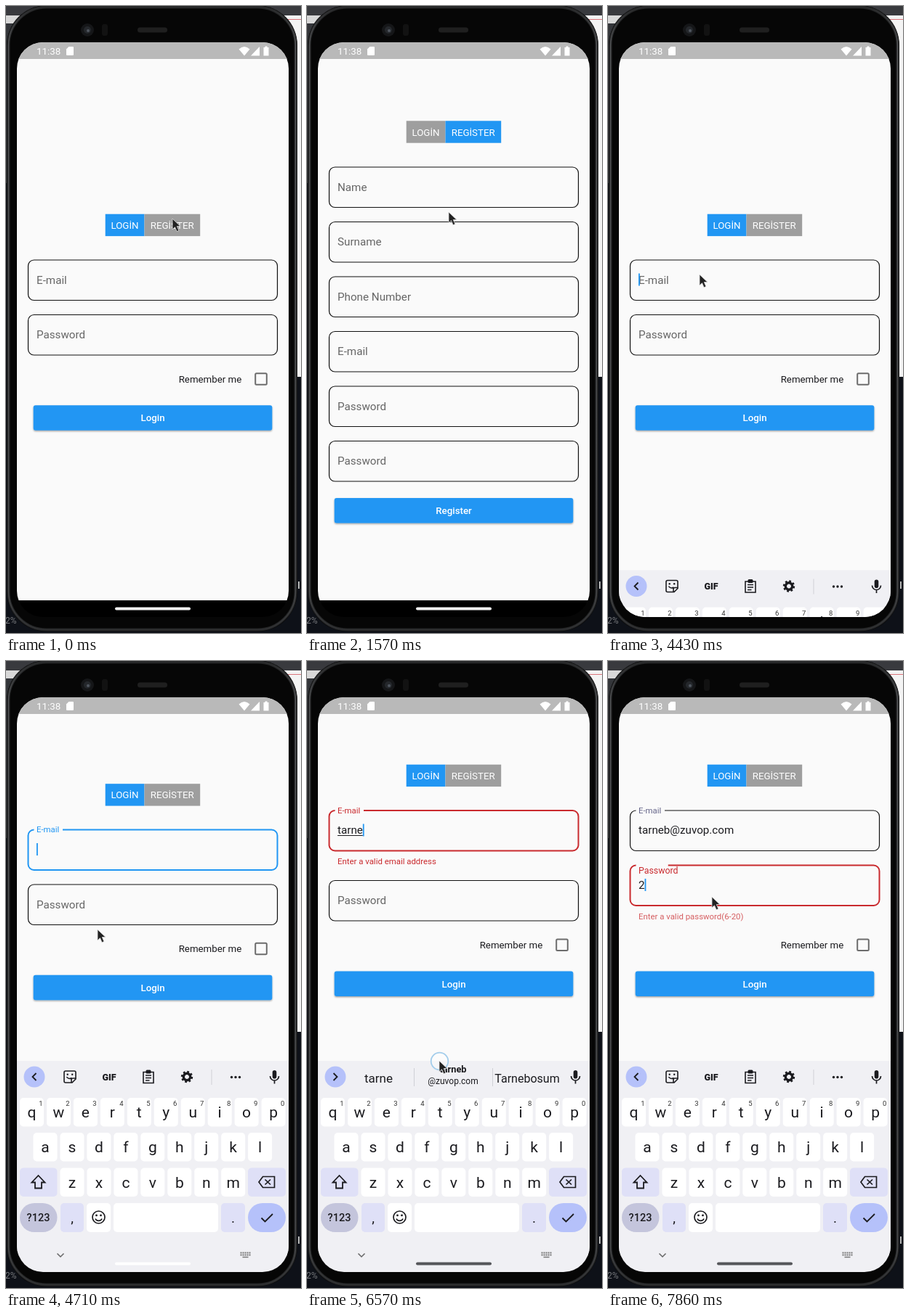
These frames come from a looping animation (406x864 px, 8000 ms). An HTML page:

```html
<!DOCTYPE html>
<html lang="en">
<head>
<meta charset="utf-8">
<title>Login form</title>
<style>
html, body { margin: 0; width: 100%; height: 100%; overflow: hidden; background: #0e1118; }
svg { display: block; width: 406px; height: 864px; }
text { font-family: Roboto, sans-serif; white-space: pre; }
</style>
</head>
<body>
<svg viewBox="0 0 406 864">
  <defs>
    <clipPath id="screen"><path d="M15 86a36 36 0 0 1 36-36H353a36 36 0 0 1 36 36V806a36 36 0 0 1-36 36H51a36 36 0 0 1-36-36z"/></clipPath>
    <filter id="drop" x="-5%" y="-20%" width="110%" height="160%"><feDropShadow dx="0" dy="1.2" stdDeviation="1.1" flood-opacity=".4"/></filter>
    <linearGradient id="rim" x2="0" y2="1">
      <stop offset="0" stop-color="#2a2b2c"/><stop offset=".06" stop-color="#515254"/>
      <stop offset=".94" stop-color="#48494b"/><stop offset="1" stop-color="#2f3032"/>
    </linearGradient>
  </defs>
  <g id="desk">
    <rect width="406" height="864" fill="#0e1118"/>
    <rect width="406" height="13" fill="#393a3e"/>
    <rect y="13" width="30" height="11" fill="#d8d8d8"/>
    <rect y="24" width="14" height="220" fill="#34363a"/>
    <rect x="380" y="13" width="26" height="498" fill="#f4f4f4"/>
    <path d="M384 18.500H406" stroke="#d9737a"/>
    <rect x="402" y="793" width="2" height="10" fill="#b8b8b8"/>
    <rect x="1" y="-1" width="400" height="863" rx="55" fill="#060606"/>
    <rect x="3.500" y="1.500" width="395" height="858" rx="52.500" fill="none" stroke="#242526" stroke-width="4"/>
    <rect x="3.500" y="1.500" width="395" height="858" rx="52.500" fill="none" stroke="url(#rim)" stroke-width="1.500"/>
    <text x="-1" y="851" font-size="12" fill="#77797d">2%</text>
    <circle cx="112" cy="33" r="9" fill="#151618"/>
    <circle cx="112" cy="33" r="5" fill="#25282c"/>
    <circle cx="113" cy="34" r="2" fill="#50565f"/>
    <rect x="132" y="25" width="8" height="16" rx="3" fill="#121212"/>
    <rect x="181" y="29.500" width="41" height="7" rx="3.500" fill="#1f1f1f"/>
  </g>
  <g clip-path="url(#screen)">
    <rect x="15" y="50" width="374" height="769" fill="#fafafa"/>
    <rect x="15" y="819" width="374" height="23" fill="#000"/>
    <rect x="150" y="828.500" width="104" height="4" rx="2" fill="#f2f2f2"/>
    <g id="app"></g>
    <g id="keys"></g>
    <rect x="15" y="50" width="374" height="23" fill="#b9b9b9"/>
    <g fill="#fff">
      <text x="42" y="67" font-size="13.400">11:38</text>
      <path d="M86.500 56H92a1 1 0 0 1 1 1V67a1 1 0 0 1-1 1H84a1 1 0 0 1-1-1V59.500z"/>
      <path d="M320.500 59.500Q328 52.500 335.500 59.500L328 68.500zM337 68.500L349 56V68.500zM356.500 57V55.500H359.500V57H361.500V68.500H354.500V57z"/>
    </g>
  </g>
  <g id="mouse"></g>
</svg>
<script>
const BLUE = '#2196f3', RED = '#c92a2e', INK = '#1b1b1f';
const ADDRESS = 'tarneb@zuvop.com';
const FLOAT_WIDTH = { 'E-mail': 39.5, 'Password': 59 };
const $ = id => document.getElementById(id);

const pen = document.createElement('canvas').getContext('2d');
const textWidth = s => {
  pen.font = '15.2px Roboto, sans-serif';
  return pen.measureText(s).width;
};

const rect = (x, y, w, h, fill, r = 0, more = '') =>
  `<rect x="${x}" y="${y}" width="${w}" height="${h}" rx="${r}" fill="${fill}" ${more}/>`;
const text = (s, x, y, size, fill, anchor = 'start', weight = 400, more = '') =>
  `<text x="${x}" y="${y}" font-size="${size}" fill="${fill}" text-anchor="${anchor}" font-weight="${weight}" ${more}>${s}</text>`;
const line = (d, color = INK, w = 1.8, more = '') =>
  `<path d="${d}" fill="none" stroke="${color}" stroke-width="${w}" ${more}/>`;
const at = (x, y, body) => `<g transform="translate(${x} ${y})">${body}</g>`;

// ---------- form ----------
function tabs(y, login) {
  return rect(136.7, y, 53.8, 30.4, login ? BLUE : '#9e9e9e') +
    rect(190.5, y, 76.7, 30.4, login ? '#9e9e9e' : BLUE) +
    text('LOGİN', 163.5, y + 20.2, 13.3, '#fff', 'middle') +
    text('REGİSTER', 228.7, y + 20.2, 13.3, '#fff', 'middle');
}

function field(label, y, o = {}) {
  const { p = 0, color = '#111', tint = '#666', value = '', caret, underline, error, fade = 1 } = o;
  const wide = color === '#111' ? 1.2 : 2;
  const gap = 38.5 + p * (FLOAT_WIDTH[label] || 0);
  let s = line(`M${gap} ${y}H365.5a8 8 0 0 1 8 8v39.500a8 8 0 0 1-8 8H38.500a8 8 0 0 1-8-8V${y + 8}a8 8 0 0 1 8-8`, color, wide);
  const size = 15.2 - 3.8 * p;
  s += text(label, 42, y + 27.5 * (1 - p) + size * 0.35, size, tint);
  const w = textWidth(value);
  if (value) s += text(value, 42, y + 32, 15.2, INK);
  if (underline) s += line(`M42 ${y + 34.5}h${w}`, INK, 1.1);
  if (caret) s += rect(42 + w, y + 18.5, 1.8, 17, BLUE);
  if (error) s += text(error, 42, y + 74, 11.4, RED, 'start', 400, `opacity="${fade}"`);
  return s;
}

const button = (label, y) => rect(37.7, y, 328.6, 34.5, BLUE, 3, 'filter="url(#drop)"') +
  text(label, 202, y + 22, 13.3, '#fff', 'middle', 500);

function registerForm() {
  const names = ['Name', 'Surname', 'Phone Number', 'E-mail', 'Password', 'Password'];
  return tabs(158.3, false) +
    names.map((n, i) => field(n, 222 + i * 75.5)).join('') + button('Register', 678);
}

function loginForm(k) {
  const badMail = k >= 38 && k < 47, badPass = k >= 55, bad = badMail || badPass;
  const lift = k < 32 ? 0 : k === 32 ? 80 : bad ? 144 : 117.5;
  const active = k >= 31 && k < 54;
  const accent = badMail ? RED : active && k > 31 ? BLUE : '';
  const mail = {
    p: k < 32 ? 0 : k === 32 ? 0.65 : 1,
    color: accent || '#111',
    tint: accent || (k >= 54 ? '#66668a' : '#666'),
    value: ADDRESS.slice(0, lettersAt(k)),
    caret: active && k !== 36 && k !== 37 && k <= 50,
    underline: badMail,
    error: badMail && 'Enter a valid email address'
  };
  const pass = badPass
    ? { p: 0.75, color: RED, tint: RED, value: '2', caret: true, error: 'Enter a valid password(6-20)', fade: 0.75 }
    : { caret: k === 54 };
  const top = 350 - lift;
  const low = bad ? 122.7 : lift;
  return tabs(286.7 - lift, true) + field('E-mail', top, mail) +
    field('Password', top + 75.5 + (badMail ? 21 : 0), pass) +
    text('Remember me', 324.3, 518.7 - low, 13.3, INK, 'end') +
    rect(343.2, 506.2 - low, 15.6, 15.6, 'none', 1.5, 'stroke="#6c6c6c" stroke-width="2"') +
    button('Login', 550.2 - low);
}

// letters present in the e-mail field, as [step, count]
const TYPING = [[0, 0], [38, 1], [39, 2], [41, 3], [43, 4], [44, 5], [47, ADDRESS.length]];
const lettersAt = k => TYPING.filter(e => e[0] <= k).pop()[1];

// ---------- keyboard ----------
const LAVENDER = '#dfe0f7', PERI = '#b5c1fa';

const mic = at(369.5, 573, rect(-2.8, -9, 5.6, 11.5, INK, 2.8) + line('M-6 -1a6 6 0 0 0 12 0M0 5V9.500', INK, 1.7));
const chevron = dir => `<circle cx="39" cy="573" r="14.500" fill="${PERI}"/>` +
  at(39, 573, line(`M${-2.5 * dir} -5L${2.5 * dir} 0L${-2.5 * dir} 5`));

const tools = chevron(-1) +
  at(88, 573, line('M-6 -8H6a2 2 0 0 1 2 2V3L3 8H-6a2 2 0 0 1-2-2V-6a2 2 0 0 1 2-2zM8 2H4a2 2 0 0 0-2 2V8M-4.500 0a4.500 4 0 0 0 7 1.500', INK, 1.6) +
    rect(-4.5, -4.5, 2.4, 2.4, INK, 1.2) + rect(2, -4.5, 2.4, 2.4, INK, 1.2)) +
  text('GIF', 142, 577.5, 12.5, INK, 'middle', 900) +
  at(196, 573, line('M-7 -6.500H7V8.500H-7zM-4 -2H4M-4 1.500H4M-4 5H1.500', INK, 1.6) + rect(-3.5, -9.5, 7, 5, INK, 1.5)) +
  at(249, 573, `<circle r="4.700" fill="none" stroke="${INK}" stroke-width="3.400"/>
    <circle r="6.900" fill="none" stroke="${INK}" stroke-width="2.600" stroke-dasharray="2.710"/>`) +
  rect(282.5, 563, 1, 21, '#cfd0d6') +
  [-5.5, 0, 5.5].map(d => `<circle cx="${316 + d}" cy="573.500" r="1.700" fill="${INK}"/>`).join('') + mic;

const suggestions = word => chevron(1) + text(word, 98.5, 580.5, 17, INK, 'middle') +
  rect(147, 561, 1, 25, '#cfd0d6') + rect(255, 561, 1, 25, '#cfd0d6') +
  text('tarneb', 201, 567, 12.8, INK, 'middle', 700) +
  text('@zuvop.com', 201, 583, 12, INK, 'middle') +
  text('Tarnebosum', 303, 580.5, 16, INK, 'middle') + mic;

const letterRow = (letters, x, y, hint) => [...letters].map((c, i) => {
  const cx = x + i * 36.95;
  return rect(cx - 16.5, y, 33, 39.5, '#fff', 5) + text(c, cx, y + 27, 21, INK, 'middle') +
    (hint ? text((i + 1) % 10, cx + 12.5, y + 11, 9.5, '#333', 'middle') : '');
}).join('');

const keyRows = letterRow('qwertyuiop', 35.5, 602, true) + letterRow('asdfghjkl', 54, 650) +
  letterRow('zxcvbnm', 91, 698.5) +
  rect(19, 698.5, 51.5, 39.5, LAVENDER, 5) + rect(333, 698.5, 52, 39.5, LAVENDER, 5) +
  at(44.5, 718, line('M0 -9L9 0.500H4.500V8.500H-4.500V0.500H-9z')) +
  at(359, 718, line('M-11 0L-5.500 -7.500H10.500V7.500H-5.500zM-2.500 -3.500L5 3.500M5 -3.500L-2.500 3.500', INK, 1.7)) +
  rect(19, 747, 51.5, 40, '#c4c5dc', 20) + text('?123', 44.5, 772, 14.5, INK, 'middle', 500) +
  rect(75, 747, 32, 40, LAVENDER, 5) + text(',', 91, 774, 19, INK, 'middle') +
  rect(111, 747, 33, 40, '#fff', 5) +
  at(127.5, 766.5, line('M-8.500 0a8.500 8.500 0 0 1 17 0a8.500 8.500 0 0 1-17 0M-4.500 2a4.800 4.500 0 0 0 9 0', INK, 1.7) +
    rect(-4.4, -4, 2.8, 2.8, INK, 1.4) + rect(1.6, -4, 2.8, 2.8, INK, 1.4)) +
  rect(148, 747, 144, 40, '#fff', 5) +
  rect(296, 747, 33, 40, LAVENDER, 5) + text('.', 312.5, 774, 19, INK, 'middle') +
  rect(333, 747, 52, 40, PERI, 20) + at(359, 767, line('M-7.500 0.500L-2.500 5.500L8 -5')) +
  at(75, 819, line('M-4.500 -2.500L0 2L4.500 -2.500', '#666', 1.5)) +
  at(329.5, 818.5, line('M-7 -3H7M-7 0H7', '#777', 1.9, 'stroke-dasharray="2 1"') + line('M-4 3H4', '#777', 1.6));

function keyboard(k) {
  if (k < 31) return '';
  const drop = k === 31 ? 226.5 : k === 32 ? 45 : 0;
  const word = ADDRESS.slice(0, Math.min(lettersAt(k), 5));
  const body = rect(15, 551, 374, 295, '#f0f0f4') + keyRows +
    (k >= 40 && k < 49 ? suggestions(word) : tools);
  return at(0, drop, body) + (k > 31 ? rect(150, 828.5, 104, 4, k < 40 ? '#fff' : '#55565a', 2) : '');
}

// ---------- pointer ----------
const PATH = [[0, 229, 293], [9, 229, 293], [11, 195, 284], [14, 168, 181], [16, 171, 174], [21, 171, 174],
  [22, 160, 250], [23, 145, 322], [25, 126, 370], [44, 126, 370], [46, 182, 551], [48, 182, 553],
  [53, 143, 325], [56, 143, 325]];
const CLICKS = [7, 8, 19, 20, 29, 30, 45, 46, 53];

function pointer(k) {
  const i = PATH.findIndex(p => p[0] > k);
  const [a, b] = [PATH[i - 1], PATH[i]];
  const u = (k - a[0]) / (b[0] - a[0]);
  const ring = CLICKS.includes(k)
    ? '<circle r="11.800" cx=".5" cy=".5" fill="#fff" fill-opacity=".4" stroke="#a3cdeb" stroke-width="1.800"/>' : '';
  return at(a[1] + (b[1] - a[1]) * u, a[2] + (b[2] - a[2]) * u, ring +
    '<path d="M0 0V15L3.500 11.700L6.100 17.700L8.900 16.500L6.300 10.600H11z" fill="#222" stroke="#ddd" stroke-width=".8"/>');
}

// ---------- playback: seven steps a second ----------
const LOOP = 8000, start = performance.now();
let shown = -1;

function draw() {
  const t = (performance.now() - start) % LOOP;
  const k = Math.min(55, Math.floor((t + 5) * 7 / 1000));
  if (k !== shown) {
    shown = k;
    $('app').innerHTML = k >= 9 && k < 19 ? registerForm() : loginForm(k);
    $('keys').innerHTML = keyboard(k);
    $('mouse').innerHTML = pointer(k);
  }
  requestAnimationFrame(draw);
}
draw();
</script>
</body>
</html>
```
